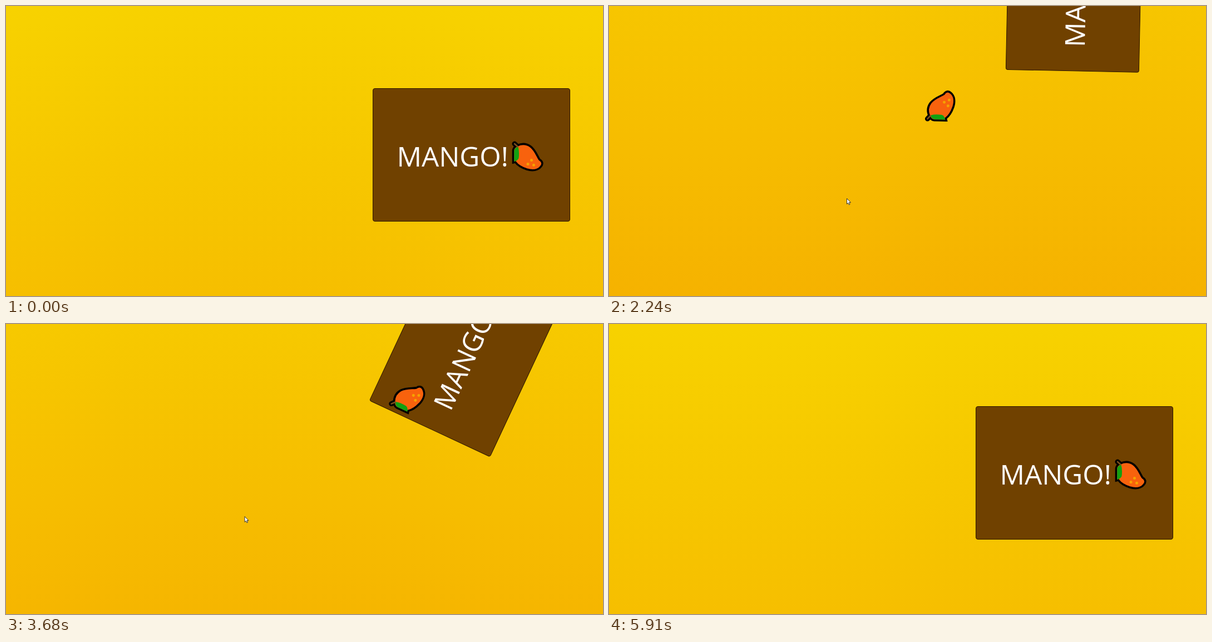
An HTML page for the animation above (6.7 s loop, 1073 by 522 pixels).

```html
<!DOCTYPE html>
<html lang="en">
<head>
<meta charset="utf-8">
<title>Mango</title>
<style>
  html, body { margin: 0; width: 100%; height: 100%; overflow: hidden; background: #f5c000; }
  svg { display: block; width: 100%; height: 100%; }
  text { font-family: "Open Sans", "Noto Sans", sans-serif; font-size: 49.3px; fill: #fff; }
</style>
</head>
<body>
<svg viewBox="0 0 1073 522" preserveAspectRatio="none">
  <defs>
    <linearGradient id="sky" x1="0" y1="0" x2="0" y2="1">
      <stop offset="0" stop-color="#f7d200"/>
      <stop offset="1" stop-color="#f5a700"/>
    </linearGradient>
  </defs>
  <rect id="page" width="1073" height="1151" fill="url(#sky)"/>

  <!-- card, centred on its own origin -->
  <g id="card">
    <rect x="-177" y="-119.5" width="354" height="239" rx="3.5" fill="#704100" stroke="#2b1700"/>
    <text x="-134" y="21.3">MANGO!</text>
  </g>

  <!-- mango, centred on its own origin -->
  <g id="mango">
    <g transform="translate(-937 -271)">
      <path d="M914 248L920 253.5" stroke="#000" stroke-width="9" stroke-linecap="round"/>
      <path d="M911.5 282V260Q912 254 919 251Q932 245 943 253C952 260 955 271 959 276.5C965 280 965 285 961.5 289C956 296 946 297 936 294C927 291 919 286 915.5 281Z"
            fill="#f8620d" stroke="#000" stroke-width="3.6"/>
      <path d="M913.3 280V261Q914 255 920.5 253.5Q923 262 921.5 274Q919.5 278.5 913.3 280Z" fill="#12a012"/>
      <path d="M914 248L919.5 253" stroke="#7c4f1d" stroke-width="2.6" stroke-linecap="round"/>
      <g fill="#f5a300">
        <circle cx="944.5" cy="277.5" r="2.5"/>
        <circle cx="938" cy="284.5" r="2.5"/>
        <circle cx="948.5" cy="286.3" r="2.5"/>
      </g>
    </g>
  </g>

  <path id="cursor" d="M.5.5V10.5L2.8 8.4L4.4 11.8L6 11L4.5 7.7H7.5Z" fill="#fff" stroke="#222" stroke-width=".9"/>
</svg>
<script>
const LOOP = 6700, STEP = 76.8;
const CENTER = { x: 836.5, y: 268 };
const el = id => document.getElementById(id);
const page = el('page'), card = el('card'), mango = el('mango'), cursor = el('cursor');

// Moves, in steps: the page scrolls down and back up twice.
const SCROLL = [
  { from: 5.4, until: 23, to: [538] },
  { from: 24, until: 36.15, to: [0] },
  { from: 39, until: 44.45, to: [240] },
  { from: 47.5, until: 53, to: [629] },
  { from: 54.3, until: 64, to: [91] },
  { from: 66, until: 76, to: [0] },
];
const POINTER = [
  { from: 2, until: 6, to: [427, 346] },
  { from: 33, until: 36, to: [428.5, 346] },
  { from: 48, until: 52, to: [457, 373] },
  { from: 64, until: 66, to: [650, 472] },
  { from: 66, until: 76, to: [682, 512] },
];

const progress = (a, b, v) => Math.min(1, Math.max(0, (v - a) / (b - a)));
const smooth = u => u * u * (3 - 2 * u);
const ease = u => (u + smooth(u)) / 2;
const mix = (a, b, u) => a + (b - a) * u;

function follow(moves, start, k) {
  return moves.reduce((pos, { from, until, to }) => {
    const u = ease(progress(from, until, k));
    return pos.map((v, i) => mix(v, to[i], u));
  }, start);
}

// Quarter turn over the first 333 px, slower after that.
const tilt = s => -0.2707 * Math.min(s, 333) - 0.157 * Math.max(0, s - 333);

// The mango rides on the card, drops off, then rolls left at a fixed height.
function mangoAt(s, angle) {
  const r = angle * Math.PI / 180, c = Math.cos(r), n = Math.sin(r);
  const x = CENTER.x + 100.5 * c - 3 * n;
  const y = CENTER.y - s + 100.5 * n + 3 * c;
  const off = smooth(progress(140, 280, s));
  return [mix(x, 924 - s, off), mix(y, 180.5, off)];
}

function place(node, x, y, angle = 0) {
  node.setAttribute('transform', `translate(${x.toFixed(2)} ${y.toFixed(2)}) rotate(${angle.toFixed(2)})`);
}

function draw(t) {
  const k = Math.floor((t + 5) / STEP);
  const [s] = follow(SCROLL, [0], k), angle = tilt(s);
  place(page, 0, -s);
  place(card, CENTER.x, CENTER.y - s, angle);
  place(mango, ...mangoAt(s, angle), angle);
  place(cursor, ...follow(POINTER, [600, 489], k));
  cursor.style.display = k >= 2 && k <= 76 ? '' : 'none';
}

const start = performance.now();
function tick() {
  draw((performance.now() - start) % LOOP);
  requestAnimationFrame(tick);
}
tick();
</script>
</body>
</html>
```
